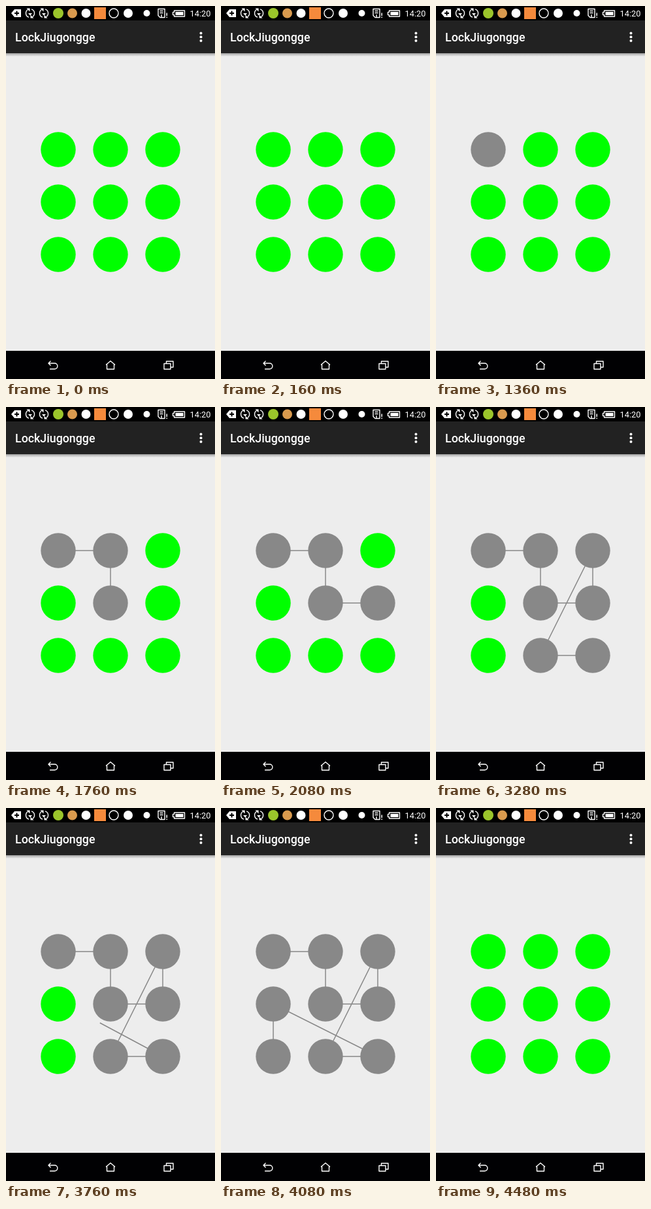
These frames come from a looping animation (320x569 px, 4.56 s). An HTML page:

```html
<!DOCTYPE html>
<html lang="en">
<head>
<meta charset="utf-8">
<title>Pattern lock</title>
<style>
  html, body { margin: 0; width: 100%; height: 100%; overflow: hidden; background: #ededed; }
  svg { display: block; width: 100vw; height: 100vh; }
  text { fill: #fff; font-family: Roboto, sans-serif; }
  .line { fill: none; stroke: #fff; stroke-width: 1.4; stroke-linejoin: round; }
  #dots circle { fill: #0f0; }
  #dots .on { fill: #888; }
  #trace { fill: none; stroke: #888; stroke-width: 1.5; }
</style>
</head>
<body>
<svg viewBox="0 0 320 569">
  <defs>
    <linearGradient id="shade" x2="0" y2="1">
      <stop stop-color="#000" stop-opacity=".32"/>
      <stop offset="1" stop-color="#000" stop-opacity="0"/>
    </linearGradient>
    <g id="sync">
      <path class="line" stroke-width="2" d="M-2 6.2A6.5 6.5 0 0 1-3.5-5.5M2-6.2A6.5 6.5 0 0 1 3.5 5.5"/>
      <path fill="#fff" d="M-5.5-7.5h5v5zM5.5 7.5h-5v-5zM-3 0h6L0 3.5z"/>
    </g>
  </defs>

  <rect width="320" height="569" fill="#ededed"/>
  <rect y="72" width="320" height="5" fill="url(#shade)"/>
  <rect y="22" width="320" height="50" fill="#222"/>
  <rect width="320" height="22"/>
  <rect y="526" width="320" height="43" fill="#010103"/>

  <!-- status bar -->
  <path fill="#fff" d="M8 11l5-6h10v12H13z"/>
  <path stroke="#000" stroke-width="2" d="M13 11h7M16.500 7.500v7"/>
  <use href="#sync" x="37" y="11"/>
  <use href="#sync" x="58" y="11"/>
  <circle cx="80" cy="11" r="8" fill="#9bc52b"/>
  <circle cx="101.500" cy="11" r="7.500" fill="#d99a4e"/>
  <circle cx="122.500" cy="11" r="7" fill="#fff"/>
  <rect x="135" y="2" width="18" height="18" fill="#f58a3c"/>
  <circle class="line" cx="165" cy="11" r="7"/>
  <circle cx="187" cy="11" r="7" fill="#fff"/>
  <circle cx="215.500" cy="11" r="5" fill="#fff"/>
  <path class="line" d="M233 4.500h10v13h-7l-3-3zM235.500 7.500h5M235.500 10.500h5M238 13v4"/>
  <path stroke="#fff" stroke-width="1.500" d="M246.200 10.500v4.500M246.200 16.500v1.500"/>
  <path class="line" stroke-width="1" d="M257.500 7h16v9h-16v-2.500h-2v-4h2z"/>
  <rect x="259.500" y="9" width="12" height="5" fill="#fff"/>
  <text x="281.500" y="16.200" font-size="12.800">14:20</text>

  <!-- title bar -->
  <text x="14" y="54" font-size="17.800" font-weight="500">LockJiugongge</text>
  <g fill="#fff">
    <circle cx="298.500" cy="41.500" r="2"/>
    <circle cx="298.500" cy="47.200" r="2"/>
    <circle cx="298.500" cy="52.900" r="2"/>
  </g>

  <path id="trace"/>
  <g id="dots"></g>

  <!-- navigation bar -->
  <g class="line">
    <path d="M68.500 541.500l-3.500 3.500 3.500 3.500M65 545h9.500a4.200 4.200 0 0 1 0 8.700H67"/>
    <path d="M153 547.500l7-6 7 6M154.500 546.500v7.500h11v-7.500"/>
    <path d="M242 545.500h10v8.500h-10zM245.500 545v-3H256v9h-4"/>
  </g>
</svg>
<script>
  const LOOP = 4560, STEP = 80, RESET = 4400;
  const RADIUS = 26.7, SPEED = 0.54, BOW = 3;

  // [dot index, time it is reached]
  const stops = [[0, 1360], [1, 1520], [4, 1760], [5, 1920], [2, 2240],
                 [7, 2800], [8, 3280], [3, 3840], [6, 4080]];
  const trace = document.getElementById('trace');
  const group = document.getElementById('dots');
  const centre = i => [80 + i % 3 * 80, 219 + Math.floor(i / 3) * 80];

  const dots = Array.from({ length: 9 }, (_, i) => {
    const dot = document.createElementNS('http://www.w3.org/2000/svg', 'circle');
    const [x, y] = centre(i);
    dot.setAttribute('cx', x);
    dot.setAttribute('cy', y);
    dot.setAttribute('r', RADIUS);
    return group.appendChild(dot);
  });

  // Finger position on the way from a to b, or null while it rests
  function fingerAt(a, b, left) {
    const dx = b[0] - a[0], dy = b[1] - a[1], len = Math.hypot(dx, dy);
    const u = (len - RADIUS - SPEED * left) / len;
    if (u <= 0) return null;
    const bend = BOW * Math.sin(Math.PI * u) / len;
    return [a[0] + dx * u - dy * bend, a[1] + dy * u + dx * bend];
  }

  function draw(t) {
    const hit = t < RESET ? stops.filter(s => s[1] <= t) : [];
    const points = hit.map(s => centre(s[0]));
    const next = stops[hit.length];
    dots.forEach((dot, i) => dot.classList.toggle('on', hit.some(s => s[0] === i)));
    if (hit.length && next) {
      const tip = fingerAt(points[points.length - 1], centre(next[0]), next[1] - t);
      if (tip) points.push(tip);
    }
    trace.setAttribute('d', points.length ? 'M' + points.join('L') : '');
  }

  function tick() {
    const t = performance.now() % LOOP;
    draw(Math.floor(t / STEP) * STEP);
    requestAnimationFrame(tick);
  }
  tick();
</script>
</body>
</html>
```
